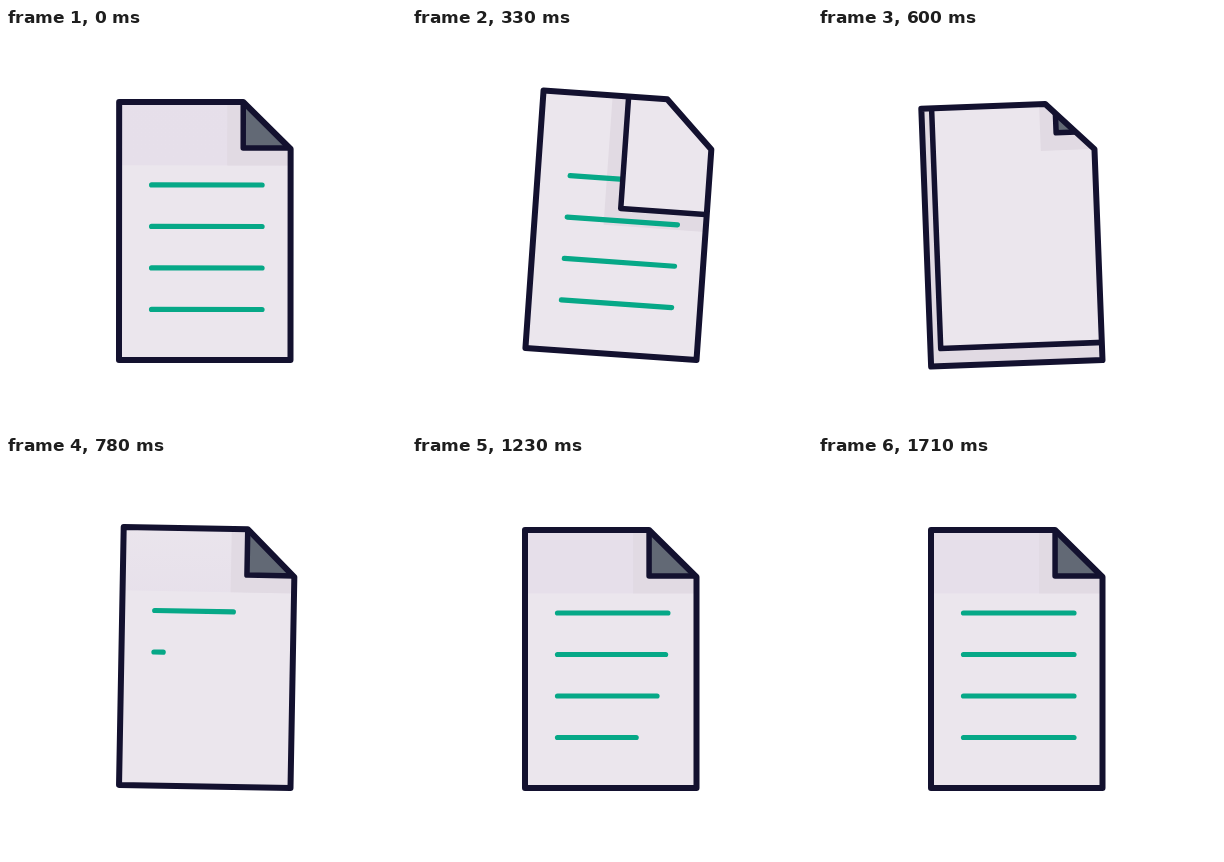
These frames come from a looping animation (400x400 px, 4400 ms). An HTML page with a canvas:

```html
<!DOCTYPE html>
<html lang="en">
<head>
<meta charset="utf-8">
<title>Turning page</title>
<style>
  html, body { margin: 0; width: 100%; height: 100%; overflow: hidden; background: #fff; }
  canvas { display: block; }
</style>
</head>
<body>
<canvas id="stage" width="400" height="400"></canvas>
<script>
const ctx = document.getElementById('stage').getContext('2d');
const LOOP = 4400;
const INK = '#13112f', PAPER = '#ebe6ed', SHADE = '#e1dae3', TEAL = '#06a887';
const LEFT = 113, TOP = 74, RIGHT = 284.5, BOTTOM = 332;
const REST = 0.12; // fold position of the resting dog-ear

const page = new Path2D(`M${LEFT} ${TOP}H237L${RIGHT} 121V${BOTTOM}H${LEFT}Z`);

// Keyframes of [ms, value]
const TILT = [[0, 0], [90, 3.2], [180, 6.3], [225, 7.2], [320, 4.4], [420, 0.75],
  [525, -3], [600, -2.2], [710, 1.8], [780, 1.05], [930, -0.2], [1110, 0]];
const TURN = [[200, REST], [300, 0.31], [420, 0.666], [510, 0.83], [600, 0.926], [690, 1.01]];
const EAR = [[560, -0.03], [600, 0.05], [720, REST]];
const WRITE = [[605, 0], [630, 0.08], [780, 0.71], [930, 0.9], [1080, 0.978], [1260, 1]];

// Smooth interpolation that never overshoots its keyframes
function track(keys, t) {
  const last = keys.length - 1;
  if (t <= keys[0][0]) return keys[0][1];
  if (t >= keys[last][0]) return keys[last][1];
  const i = keys.findIndex(k => k[0] > t) - 1;
  const rise = j => (keys[j + 1][1] - keys[j][1]) / (keys[j + 1][0] - keys[j][0]);
  const slope = j => {
    if (j === 0) return rise(0);
    if (j === last) return 0;
    const a = rise(j - 1), b = rise(j);
    return a * b > 0 ? 2 * a * b / (a + b) : 0;
  };
  const [t0, v0] = keys[i], [t1, v1] = keys[i + 1];
  const span = t1 - t0, u = (t - t0) / span, w = 1 - u;
  return w * w * (1 + 2 * u) * v0 + u * u * (3 - 2 * u) * v1
    + span * (u * w * w * slope(i) - u * u * w * slope(i + 1));
}

const clamp = v => Math.max(0, Math.min(1, v));

function drawLines(amount) {
  ctx.strokeStyle = TEAL;
  ctx.lineWidth = 5.2;
  for (let i = 0; i < 4; i++) {
    const length = 110.5 * amount(i), y = 157 + 41.5 * i;
    if (length <= 0) continue;
    ctx.beginPath();
    ctx.moveTo(145.5, y);
    ctx.lineTo(145.5 + length, y);
    ctx.stroke();
  }
}

function drawShade(x, low, tilt) {
  // Faint band beside the fold, visible while the page is nearly upright
  const lean = 0.8 * Math.abs(tilt);
  const band = ctx.createLinearGradient(0, low - 65, 0, low);
  band.addColorStop(0, `rgba(230,223,234,${clamp(1 - lean)})`);
  band.addColorStop(1, `rgba(230,223,234,${clamp(1.6 - lean)})`);
  ctx.fillStyle = band;
  ctx.fillRect(LEFT, low - 65, RIGHT - LEFT, 65);

  ctx.fillStyle = SHADE;
  ctx.fillRect(x - 16, 0, 400, low);
}

function drawFold(x, y, reveal) {
  ctx.fillStyle = '#626975';
  ctx.fillRect(x, 0, 400, y);
  ctx.globalAlpha = reveal;
  ctx.fillStyle = PAPER;
  ctx.fillRect(x, 0, 400, y);
  ctx.globalAlpha = 1;

  ctx.strokeStyle = INK;
  ctx.lineWidth = 5.5;
  ctx.beginPath();
  ctx.moveTo(x, 0);
  ctx.lineTo(x, y);
  ctx.lineTo(400, y);
  ctx.stroke();
}

function drawSheet(position, tilt, reveal, amount) {
  const x = 254 - 141 * position, y = 91 + 241 * position;
  drawShade(x, y + 17.5, tilt);
  drawLines(amount);
  drawFold(x, y, reveal);
}

function draw(t) {
  const tilt = track(TILT, t);
  ctx.fillStyle = '#fff';
  ctx.fillRect(0, 0, 400, 400);
  ctx.lineCap = ctx.lineJoin = 'round';

  ctx.save();
  ctx.translate(RIGHT, BOTTOM);
  ctx.rotate(tilt * Math.PI / 180);
  ctx.translate(-RIGHT, -BOTTOM);

  ctx.save();
  ctx.clip(page);
  ctx.fillStyle = PAPER;
  ctx.fill(page);
  if (t < 690) drawSheet(track(TURN, t), tilt, clamp((t - 210) / 120), () => 1);
  if (t >= 560) drawSheet(track(EAR, t), tilt, 0, i => track(WRITE, t - 150 * i));
  ctx.restore();

  ctx.strokeStyle = INK;
  ctx.lineWidth = 6;
  ctx.stroke(page);
  ctx.restore();
}

const start = performance.now();
function tick() {
  draw((performance.now() - start) % LOOP);
  requestAnimationFrame(tick);
}
tick();
</script>
</body>
</html>
```
